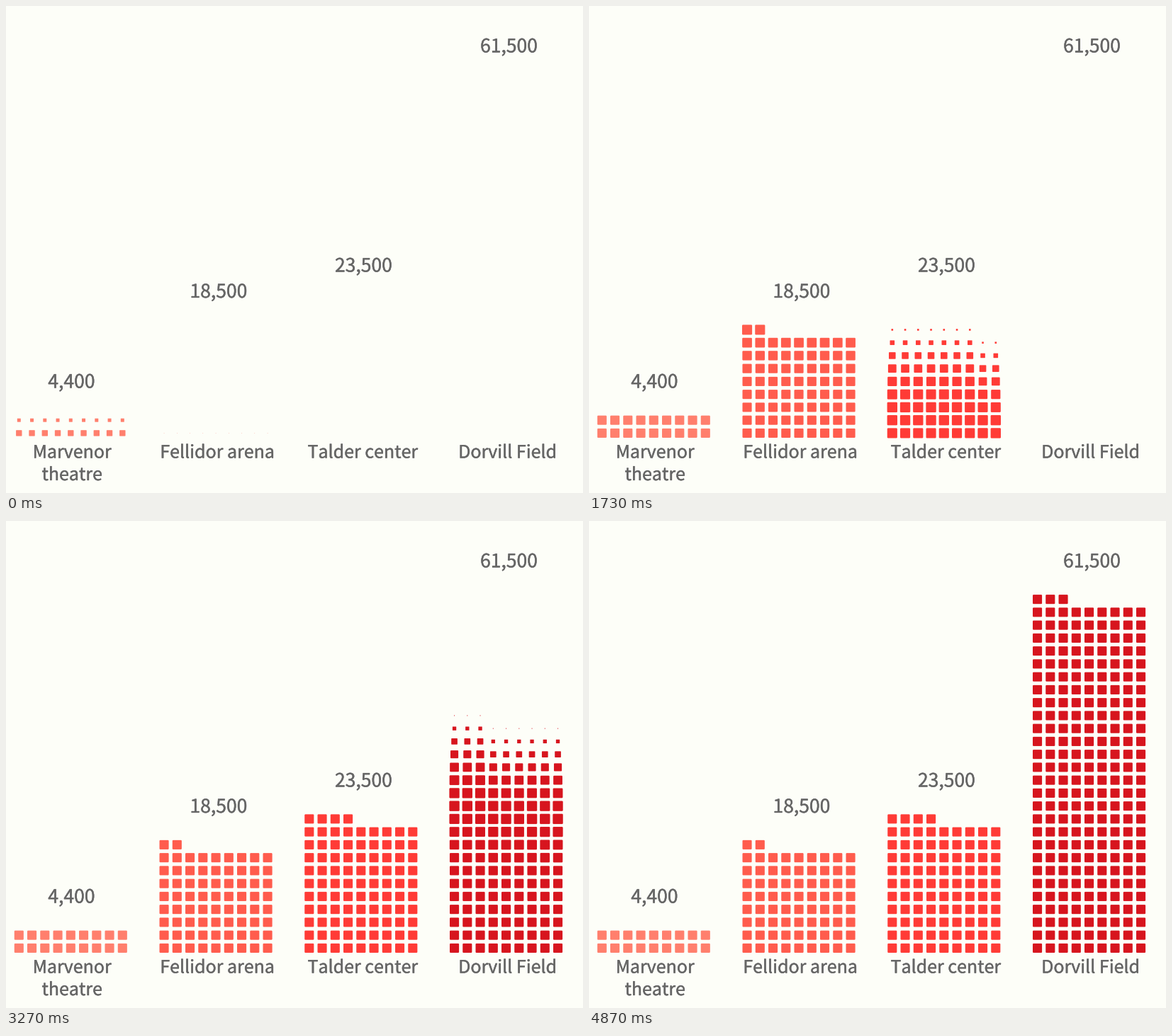
Animation of 814 by 688 pixels, one loop 5190 ms. Source, as a matplotlib script:

```python
import numpy as np
import matplotlib.pyplot as plt
from matplotlib.animation import FuncAnimation
from matplotlib.collections import PolyCollection
from matplotlib.patheffects import withStroke

W, H, DPI = 814, 688, 64
LOOP, INTERVAL = 5190, 30
FRAMES = LOOP // INTERVAL
STEP = 1000 / 15          # the picture advances 15 times a second
LAST_STEP = 73

BG, INK = "#fdfef8", "#666666"
COLS, PITCH, SIDE = 9, 18.25, 13.1
LEFT, BOTTOM, BLOCK_GAP = 18.3, 603.4, 204.75
PER_SQUARE = 250
GROW = 12                 # growth time, in units of the delay between groups
LABEL_PX, NUMBER_PX, LINE_PX = 25, 26.5, 31.5

# seats, colour, label lines, label x, number x, number baseline
VENUES = [
    (4400, "#ff7f6d", ["Marvenor", "theatre"], 93, 92.5, 539.5),
    (18500, "#ff5c4d", ["Fellidor arena"], 298, 300, 412),
    (23500, "#ff3b36", ["Talder center"], 503, 504.5, 375.5),
    (61500, "#d7151e", ["Dorvill Field"], 707.5, 709.5, 65.5),
]

# pace of the wave: step number -> groups started
PACE_STEP = [0, 12, 16, 20, 42, 57, 64, 73]
PACE_GROUP = [2.1, 8.15, 10.45, 14.4, 32.6, 44.6, 50.7, 59]


def ease_out_back(t):
    x = np.clip(t, 0, 1) - 1
    c = 1.70158
    return 1 + (c + 1) * x**3 + c * x**2


def layout():
    """Centres and colours of all squares, block after block."""
    centers, colors = [], []
    for block, (seats, color, *_) in enumerate(VENUES):
        for i in range(-(-seats // PER_SQUARE)):
            row, col = divmod(i, COLS)
            centers.append((LEFT + block * BLOCK_GAP + col * PITCH,
                            BOTTOM - row * PITCH))
            colors.append(color)
    return np.array(centers), colors


def soft_square(cut=0.06):
    """Unit square with slightly clipped corners."""
    a, b = 0.5, 0.5 - cut
    return np.array([(-b, -a), (b, -a), (a, -b), (a, b),
                     (b, a), (-b, a), (-a, b), (-a, -b)])


fig = plt.figure(figsize=(W / DPI, H / DPI), dpi=DPI, facecolor=BG)
ax = fig.add_axes([0, 0, 1, 1])
ax.set_xlim(0, W)
ax.set_ylim(H, 0)
ax.axis("off")


def write(x, baseline, text, px):
    """Centred text, made a touch heavier than the regular weight."""
    ax.text(x, baseline, text, color=INK, family="Noto Sans CJK JP",
            size=px * 72 / DPI, ha="center", va="baseline",
            path_effects=[withStroke(linewidth=0.4, foreground=INK)])


for seats, _, lines, label_x, number_x, number_y in VENUES:
    write(number_x, number_y, f"{seats:,}", NUMBER_PX)
    for n, line in enumerate(lines):
        write(label_x, 638.5 + LINE_PX * n, line, LABEL_PX)

centers, colors = layout()
groups = np.arange(len(centers)) // COLS
shape = soft_square()
squares = PolyCollection([], facecolors=colors, linewidths=0)
ax.add_collection(squares, autolim=False)


def draw(frame):
    step = min(int((frame * INTERVAL + 20) / STEP), LAST_STEP)
    front = np.interp(step, PACE_STEP, PACE_GROUP)
    size = SIDE * ease_out_back((front - groups) / GROW)
    squares.set_verts(centers[:, None] + size[:, None, None] * shape)
    return [squares]


anim = FuncAnimation(fig, draw, frames=FRAMES, interval=INTERVAL,
                     init_func=lambda: draw(0), repeat=True, repeat_delay=0)
plt.show()
```
